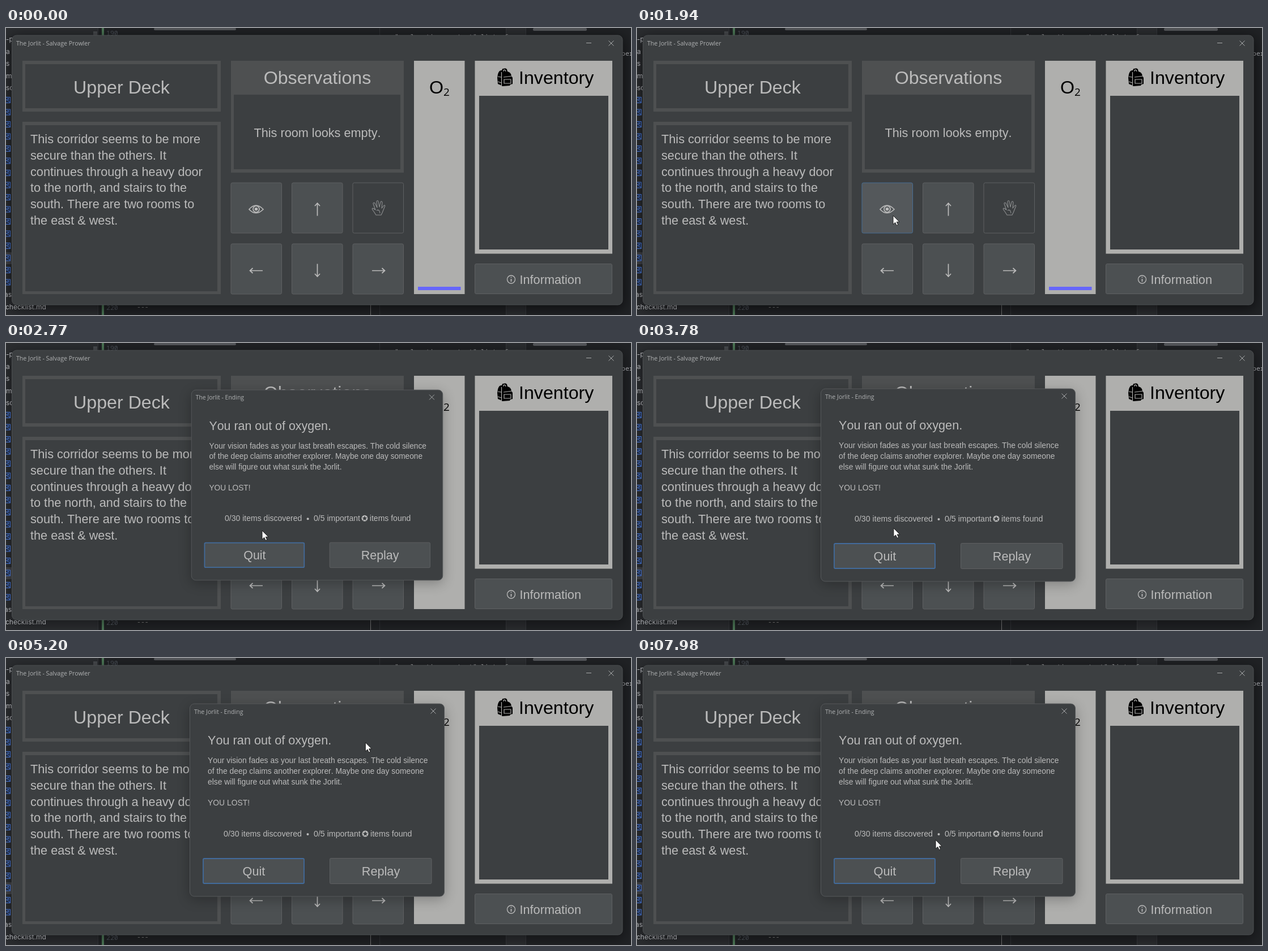
Recreate the animation shown at these times as an HTML page. Size 1103x508 px, loop 8000 ms.

```html
<!DOCTYPE html>
<html lang="en">
<head>
<meta charset="utf-8">
<title>Treasure game</title>
<style>
html, body { margin: 0; width: 100%; height: 100%; overflow: hidden; background: #1e1f22; }
svg { display: block; width: 1103px; height: 508px; }
text { font-family: "Liberation Sans", Arial, sans-serif; font-kerning: none; fill: #bbb; white-space: pre; }
.h { font-size: 32.2px; }
.b { font-size: 21.7px; }
.p { font-size: 13.9px; }
.count { font-size: 14.2px; }
.mid { text-anchor: middle; }
.cap { font: 10.6px "Open Sans", sans-serif; fill: #b0b2b3; }
.ide { font: 12px Inter, sans-serif; fill: #c4c6cb; }
.mono { font: 11.5px "Noto Sans Mono", monospace; fill: #4d525a; }
.win { fill: #3c3f41; stroke: #4b4e50; }
.frame { fill: #4e5051; }
.light { fill: #afafad; }
.in { fill: #3c3f41; }
.btn { fill: #4c5052; stroke: #5e6062; }
.off { fill: #3c3f41; }
.hover { fill: #54585b; stroke: #466d94; }
.press { fill: #5c6164; stroke: #466d94; }
.line { fill: none; stroke: #bbb; stroke-width: 1.7; }
.thin { fill: none; stroke: #a9abac; stroke-width: 1; }
.hand { fill: none; stroke: #8d8f90; stroke-width: 1.1; stroke-linejoin: round; }
</style>
</head>
<body>
<svg viewBox="0 0 1103 508">
  <defs>
    <path id="arrow" class="line" d="M-11.5 0H11M6 -4.5L11 0L6 4.5"/>
    <path id="close" class="thin" d="M-4.5 -4.5L4.5 4.5M4.5 -4.5L-4.5 4.5"/>
    <filter id="soft" x="-10%" y="-15%" width="120%" height="130%"><feGaussianBlur stdDeviation="11"/></filter>
  </defs>

  <!-- editor behind the game -->
  <rect width="1103" height="508" fill="#202225"/>
  <rect width="162" height="508" fill="#2b2d30"/>
  <rect x="882" width="35" height="508" fill="#2b2d30"/>
  <path d="M162.5 0V508M882.5 0V508M917.5 0V508" stroke="#35373b"/>
  <path d="M643.5 488V508" stroke="#777"/>
  <path d="M659.5 0V508" stroke="#303236"/>
  <rect x="154" y="6" width="7" height="8" fill="#484b4e"/>
  <rect x="169" width="4" height="508" fill="#4c7656"/>
  <rect x="261" width="145" height="4" rx="2" fill="#56585c"/>
  <rect x="930" width="95" height="5" rx="2" fill="#56585c"/>
  <g id="files"></g>
  <text class="mono" x="177" y="13">190</text>
  <text class="mono" x="177" y="499">220</text>
  <text class="mono" x="231" y="497" style="fill:#888">---</text>
  <text class="mono" x="686" y="19" style="fill:#aaa">"explanation as text" list of</text>
  <text class="mono" x="680" y="487" style="fill:#aaa">playing</text>
  <text class="mono" x="1086" y="49" style="fill:#b4b6ba">per</text>

  <!-- game window -->
  <rect id="shade" x="8" y="15" width="1083" height="482" rx="10" filter="url(#soft)"/>
  <rect class="win" x="10.5" y="13" width="1077.5" height="477" rx="8"/>
  <text class="cap" x="18" y="31">The Jorlit - Salvage Prowler</text>
  <path class="thin" d="M1024 26.5H1033"/>
  <use href="#close" x="1068" y="27"/>

  <rect class="frame" x="29" y="58" width="350" height="90"/>
  <rect class="in" x="34" y="64" width="339" height="78"/>
  <text class="h mid" x="204" y="116">Upper Deck</text>

  <rect class="frame" x="29" y="166" width="350" height="305"/>
  <rect class="in" x="34" y="172" width="339" height="294"/>
  <g id="story"></g>

  <rect class="frame" x="397" y="58" width="305" height="198"/>
  <rect class="in" x="402" y="118" width="294" height="132"/>
  <text class="h mid" x="549.5" y="99">Observations</text>
  <text class="b mid" x="549.5" y="193">This room looks empty.</text>

  <rect class="light" x="720" y="58" width="89.5" height="413"/>
  <text x="747" y="116" class="h" style="fill:#000">O</text>
  <text x="772" y="120" style="font:19px 'Open Sans',sans-serif;fill:#000">2</text>
  <rect id="oxygen" x="727" y="458" width="75.5" height="6" fill="#6666fa"/>

  <rect class="light" x="827.5" y="58" width="242.5" height="341.5"/>
  <rect class="in" x="835" y="120" width="228" height="272"/>
  <text class="h" x="905" y="99" style="fill:#000">Inventory</text>
  <path d="M868 82Q870 74 875 75Q876 71 879 72Q881 70 884 73L885 77Q891 78 892 85L894 88V99L890 100L889 102L876 103L873 101L868 99L867 88Z"/>
  <path d="M874.5 78V102M868 86L874 87M868 95L874 97M878 87L893 85M879 91H891V98H879ZM878 77V74.5Q881 73 882 77" fill="none" stroke="#afafad" stroke-width="1.2"/>

  <g id="buttons"></g>
  <path class="line" d="M429 321Q441 307 454 321Q441 334 429 321Z"/>
  <circle class="line" cx="441.5" cy="320.5" r="5.5"/>
  <circle cx="441.5" cy="320.5" r="2.8" fill="#bbb"/>
  <use href="#arrow" transform="translate(549.5 321) rotate(-90)"/>
  <use href="#arrow" transform="translate(549.5 429) rotate(90)"/>
  <use href="#arrow" transform="translate(441.5 429.5) rotate(180)"/>
  <use href="#arrow" transform="translate(657.5 429.5)"/>
  <path class="hand" d="M653 331Q650 326 647 322Q645 319 648 319L652 322L648 311Q648 308 651 310L655 318L654 307Q656 304 657 307L659 317L661 308Q663 305 664 309L663 319L667 314Q670 313 668 317L664 327L662 331ZM654 323Q659 320 660 328"/>
  <circle class="line" cx="891.5" cy="445" r="7" style="stroke-width:1.3"/>
  <path class="line" d="M891.5 444V449M891.5 440.5V442"/>
  <text class="b" x="906.5" y="453">Information</text>

  <!-- ending dialog -->
  <g id="dialog">
    <rect x="323" y="86" width="452" height="342" rx="10" filter="url(#soft)" opacity=".25"/>
    <rect class="win" x="324.5" y="81" width="449" height="341" rx="8" style="stroke:#56595b"/>
    <text class="cap" x="332" y="98.5">The Jorlit - Ending</text>
    <use href="#close" x="754" y="94"/>
    <text class="b" x="356" y="153">You ran out of oxygen.</text>
    <g id="ending"></g>
    <text class="count" x="384" y="316">0/30 items discovered</text>
    <circle cx="532.5" cy="312" r="2" fill="#bbb"/>
    <text class="count" x="543" y="316">0/5 important</text>
    <circle cx="634" cy="311" r="5.5" fill="#bbb"/>
    <path d="M634 306.5L635.3 309.5L638.5 309.7L636 311.8L636.8 315L634 313.2L631.2 315L632 311.8L629.5 309.7L632.7 309.5Z" fill="#3c3f41"/>
    <text class="count" x="643" y="316">items found</text>
    <rect class="btn" x="348" y="355" width="178" height="44" rx="2" style="stroke:#426b9c;stroke-width:1.8"/>
    <rect class="btn" x="571.5" y="354.5" width="179.500" height="45" rx="2"/>
    <text class="b mid" x="437.5" y="385">Quit</text>
    <text class="b mid" x="661.5" y="385">Replay</text>
  </g>

  <path id="cursor" d="M0 0V15.5L3.7 12.2L6.2 17.5L8.7 16.3L6.3 11.2H11Z" fill="#fff" stroke="#111" stroke-width=".9"/>
</svg>
<script>
const $ = id => document.getElementById(id);
const lines = (id, cls, x, y, step, rows) => {
  $(id).innerHTML = rows.map((row, i) => `<text class="${cls}" x="${x}" y="${y + i * step}">${row}</text>`).join("");
};

lines("story", "b", 43, 204, 28.75, [
  "This corridor seems to be more", "secure than the others. It", "continues through a heavy door",
  "to the north, and stairs to the", "south. There are two rooms to", "the east &amp; west."]);
lines("ending", "p", 356, 186, 18.75, [
  "Your vision fades as your last breath escapes. The cold silence",
  "of the deep claims another explorer. Maybe one day someone",
  "else will figure out what sunk the Jorlit.", "", "YOU LOST!"]);

// project tree, mostly hidden by the game window
lines("files", "ide", 0, 24, 21.5, ["-p", "a", "s", "ma", "scr"]);
let tree = '<rect y="397" width="162" height="21" fill="#43454a"/>';
for (let i = 0; i < 16; i++) {
  const y = 127.5 + i * 21.5;
  tree += `<g fill="none" stroke="#548af7"><rect x="-4.5" y="${y - 5}" width="12" height="10" fill="#25324d"/>
    <path d="M-4 ${y + 4}L1 ${y - 1}L7 ${y + 4}"/><circle cx="4" cy="${y - 2}" r="1"/></g>`;
}
tree += '<text class="ide" x="-3" y="476">as!</text><text class="ide" x="-1" y="498">checklist.md</text>';
$("files").innerHTML += tree;

const boxes = [[397, 274], [504.5, 274], [612, 274], [397, 382], [504.5, 382], [612, 382], [827.5, 417.5, 242, 53]];
$("buttons").innerHTML = boxes.map(([x, y, w = 89.5, h = 89]) =>
  `<rect x="${x}" y="${y}" width="${w}" height="${h}" rx="2.5"/>`).join("");
const buttons = [...$("buttons").children];

// pointer: time, x, y
const path = [
  [390, 1059, 489], [460, 1005, 475], [590, 905, 445], [730, 810, 416], [920, 738, 396],
  [1180, 738, 396], [1450, 610, 367], [1740, 492, 338], [1940, 452, 332],
  [3710, 452, 332], [3780, 453, 328], [4000, 429, 260], [4280, 500, 185], [4530, 605, 146],
  [4560, 605, 146], [4740, 450, 190], [4840, 357, 230], [4980, 480, 285], [5110, 660, 195],
  [5200, 635, 150], [5340, 541, 99], [5380, 541, 99], [5640, 399, 190], [5960, 541, 287],
  [6540, 541, 287], [6590, 528, 287], [6800, 440, 335], [7050, 417, 371],
  [7850, 417, 371], [7910, 480, 342], [7980, 527, 322]];

function pointer(t) {
  const i = path.findIndex(k => k[0] > t);
  if (i < 0) return path.at(-1).slice(1);
  const [t0, x0, y0] = path[i - 1], [t1, x1, y1] = path[i];
  const u = (t - t0) / (t1 - t0);
  return [x0 + (x1 - x0) * u, y0 + (y1 - y0) * u];
}

function draw(now) {
  const t = now % 8000;
  const [px, py] = t < 390 ? [-50, -50] : pointer(t);
  $("cursor").setAttribute("transform", `translate(${px} ${py})`);

  buttons.forEach((el, i) => {
    const [x, y, w = 89.5, h = 89] = boxes[i];
    const over = t < 2650 && px >= x && px < x + w && py >= y && py < y + h;
    const state = i === 2 ? "off" : !over ? "" : t > 2330 && t < 2480 ? "press" : "hover";
    el.setAttribute("class", "btn " + state);
  });

  $("oxygen").style.display = t < 2400 ? "" : "none";
  $("shade").setAttribute("opacity", t < 2480 ? .55 : .4);

  const u = Math.min(1, (t - 2650) / 250);
  $("dialog").style.display = u < 0 ? "none" : "";
  $("dialog").setAttribute("opacity", Math.min(1, .3 + 1.5 * u));
  const s = 1 - .09 * (1 - u) ** 3;
  $("dialog").setAttribute("transform", `translate(548.5 251) scale(${s}) translate(-548.5 -251)`);
}

const start = performance.now();
(function loop() {
  draw(performance.now() - start);
  requestAnimationFrame(loop);
})();
</script>
</body>
</html>
```
